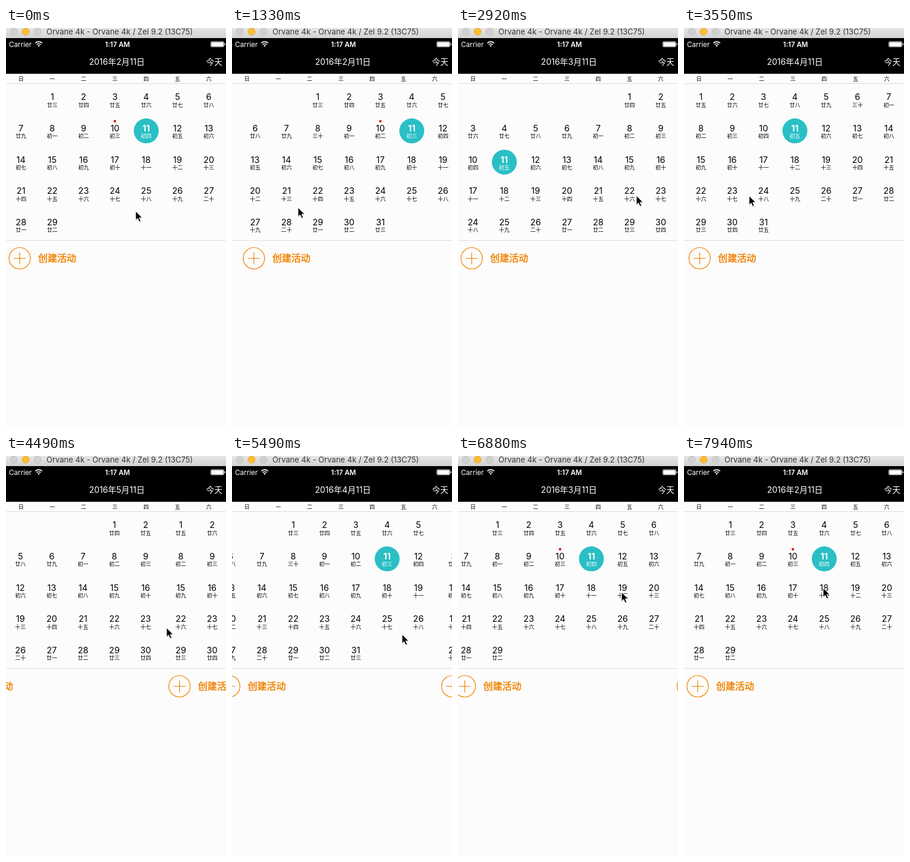
Write an HTML page that moves like this. It is 370 px wide and 673 px high and loops after 8 s.

```html
<!DOCTYPE html>
<html lang="zh-CN">
<head>
<meta charset="utf-8">
<title>Calendar</title>
<style>
  html, body { margin: 0; width: 100%; height: 100%; overflow: hidden; background: #fcfcfc; }
  svg { display: block; font-family: Inter, "Noto Sans CJK SC", "Noto Sans CJK", sans-serif; }
  .mid { text-anchor: middle; }
  .day { font-size: 14.5px; }
  .lunar { font-size: 9px; }
  .on { fill: #fff; }
  .on .day { font-weight: 700; }
  .add { font-size: 16px; fill: #f08200; stroke: #f08200; stroke-width: .5; }
  .plus { fill: none; stroke: #f08200; stroke-width: 1.2; }
</style>
</head>
<body>
<svg width="370" height="673" viewBox="0 0 370 673">
  <defs>
    <linearGradient id="chrome" x2="0" y2="1">
      <stop offset="0" stop-color="#e6e6e6"/><stop offset="1" stop-color="#d2d2d2"/>
    </linearGradient>
  </defs>
  <rect width="370" height="673" fill="#fcfcfc"/>
  <g id="pages"></g>
  <path d="M0 357.5H370" stroke="#dedede"/>

  <rect y="77" width="370" height="17" fill="#fdfdfd"/>
  <path d="M0 93.5H370" stroke="#dcdcdc"/>
  <g id="week" class="mid lunar"></g>

  <rect y="16" width="370" height="61"/>
  <rect width="370" height="17" fill="url(#chrome)"/>
  <g stroke-width=".8">
    <circle cx="13" cy="6" r="6" fill="#d0d0d0" stroke="#bcbcbc"/>
    <circle cx="33" cy="6" r="6" fill="#fdbd30" stroke="#dfa023"/>
    <circle cx="53" cy="6" r="6" fill="#d0d0d0" stroke="#bcbcbc"/>
  </g>
  <text x="68" y="11" font-size="13" fill="#363636">Orvane 4k - Orvane 4k / Zel 9.2 (13C75)</text>

  <g fill="#fff">
    <text x="5" y="31.5" font-size="11.7">Carrier</text>
    <text x="187.5" y="31.5" class="mid" font-size="11.5" font-weight="600">1:17 AM</text>
    <path d="M49.3 25.4a8.4 8.4 0 0 1 11.4 0M51.6 28a5 5 0 0 1 6.8 0" fill="none" stroke="#fff" stroke-width="1.7"/>
    <path d="M53.2 29.7a2.6 2.6 0 0 1 3.6 0L55 31.7Z"/>
    <rect x="344.5" y="22.8" width="22" height="9" rx="1.8" fill="none" stroke="#fff" stroke-width=".8"/>
    <rect x="345.4" y="23.7" width="20.2" height="7.2" rx=".8"/>
    <path d="M367.6 25.8q1.6 .3 1.6 1.5t-1.6 1.5Z"/>
    <text id="date" x="186.5" y="62" class="mid" font-size="14"></text>
    <text x="350.3" y="62" class="mid" font-size="13.7">今天</text>
  </g>

  <g id="cursor">
    <path d="M0 0V15.4L3.5 12.2 6 18 8.7 16.9 6.2 11.2H11Z" transform="translate(.6 1.2)" opacity=".2"/>
    <path d="M0 0V15.4L3.5 12.2 6 18 8.7 16.9 6.2 11.2H11Z" stroke="#fff"/>
  </g>
</svg>
<script>
const LOOP = 8000, PAGE = 375, COL = 52.65, ROW = 52.65, SPEED = 12 / 1000;
const YEAR = 2016, FIRST = 2, LAST = 5, PICKED = 11;
const $ = id => document.getElementById(id);

// start of each glide, pointer x from/to, pointer y, moment the heading follows
const swipes = [
  { at: 905,  from: 300, to: 111, y: 302, title: 1840 },
  { at: 1850, from: 300, to: 112, y: 290, title: 3050 },
  { at: 2985, from: 300, to: 110, y: 282, title: 3900 },
  { at: 4281, from: 100, to: 270, y: 289, title: 5000 },
  { at: 5135, from: 140, to: 286, y: 300, title: 5960 },
  { at: 6437, from: 146, to: 275, y: 229, title: 7260 }
];
const step = s => Math.sign(s.from - s.to);
const lastSwipe = swipes[swipes.length - 1];

// the pointer arrives, flicks, rests, then travels to the next swipe
const stops = [
  [0, 218, 308], [420, 218, 308],
  ...swipes.flatMap(({ at, from, to, y }) =>
    [[at - 150, from, y], [at - 60, from, y], [at + 50, to, y], [at + 480, to, y]]),
  [7800, 234, 222], [LOOP, 234, 222]
];

const digits = '一二三四五六七八九十';
const colX = c => 25.2 + c * COL;

// lunar months counted from the new moon of 8 February
const newMoon = k => Math.floor(29.53 * k + .6);
function lunarDay(date) {
  const n = Math.round((date - Date.UTC(YEAR, 1, 8)) / 864e5);
  let k = 4;
  while (newMoon(k) > n) k--;
  return n - newMoon(k) + 1;
}

function lunarName(d) {
  if (d === 20) return '二十';
  if (d === 30) return '三十';
  return ['初', '十', '廿'][Math.floor((d - 1) / 10)] + digits[(d - 1) % 10];
}

function dayCell(month, d) {
  const date = new Date(Date.UTC(YEAR, month - 1, d));
  const col = date.getUTCDay(), row = Math.floor((d - 1 - col + 6) / 7);
  const on = d === PICKED, dot = d === PICKED - 1 && month < FIRST + 2;
  return `<g id="d${month}-${d}" class="${on ? 'on' : ''}" transform="translate(${colX(col)} ${row * ROW})">` +
    (on ? '<circle cx=".1" cy="120.4" r="21" fill="#2abfc5"/>' : '') +
    (dot ? `<circle id="dot${month}" cy="104.3" r="2.1" fill="#e60012"/>` : '') +
    `<text class="day" y="121.3">${d}</text>` +
    `<text class="lunar" y="132.6">${lunarName(lunarDay(date))}</text></g>`;
}

function page(month) {
  const days = new Date(Date.UTC(YEAR, month, 0)).getUTCDate();
  let cells = '';
  for (let d = 1; d <= days; d++) cells += dayCell(month, d);
  return `<g transform="translate(${(month - FIRST) * PAGE} 0)"><g class="mid">${cells}</g>` +
    '<path class="plus" d="M13 387.5h20M23 377.5v20"/>' +
    '<circle class="plus" cx="23" cy="387.5" r="18"/>' +
    '<text class="add" x="54" y="393.4">创建活动</text></g>';
}

for (let m = FIRST; m <= LAST; m++) $('pages').innerHTML += page(m);
$('week').innerHTML = [...'日一二三四五六'].map((c, i) => `<text x="${colX(i)}" y="89">${c}</text>`).join('');

const pages = $('pages'), heading = $('date'), cursor = $('cursor');
const marchDot = $('dot3'), pressed = $('d3-15');

// critically damped glide from 0 to 1
const glide = u => u <= 0 ? 0 : 1 - (1 + u) * Math.exp(-u);

function cursorAt(t) {
  const i = stops.findIndex(s => s[0] > t);
  const [t0, x0, y0] = stops[i - 1], [t1, x1, y1] = stops[i];
  const p = (t - t0) / (t1 - t0), e = p * p * (3 - 2 * p);
  return [x0 + (x1 - x0) * e, y0 + (y1 - y0) * e];
}

function draw(t) {
  let pos = 0, month = FIRST;
  for (const s of swipes) {
    pos += step(s) * glide((t - s.at) * SPEED);
    if (t >= s.title) month += step(s);
  }
  pages.setAttribute('transform', `translate(${(-pos * PAGE).toFixed(2)} 0)`);
  heading.textContent = `${YEAR}年${month}月${PICKED}日`;
  marchDot.setAttribute('opacity', t < swipes[1].at ? 1 : 0);
  pressed.setAttribute('opacity', Math.abs(t - lastSwipe.at - 45) < 55 ? .5 : 1);
  cursor.setAttribute('transform', `translate(${cursorAt(t)})`);
}

const origin = performance.now();
function tick() {
  draw((performance.now() - origin) % LOOP);
  requestAnimationFrame(tick);
}
tick();
</script>
</body>
</html>
```
